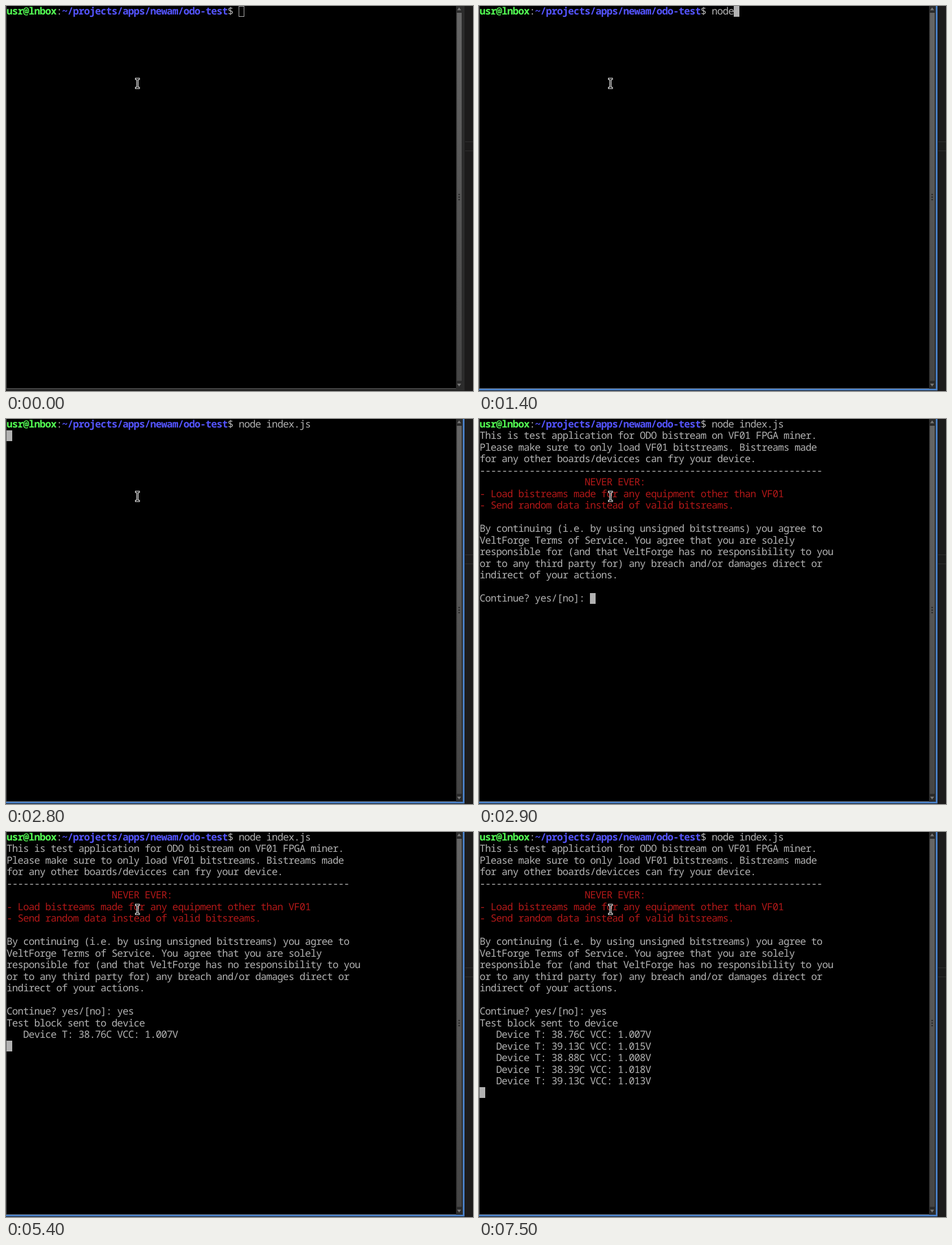
An HTML page that plays this animation: 825x679 px, repeating every 8000 ms.

```html
<!DOCTYPE html>
<html lang="en">
<head>
<meta charset="utf-8">
<title>Terminal session</title>
<style>
  html, body { margin: 0; width: 100%; height: 100%; overflow: hidden; background: #1c1c1c; }
  #stage { position: relative; width: 825px; height: 679px; overflow: hidden; background: #1c1b1b; }
  #stage > * { position: absolute; }
  #frame { left: 0; top: 0; width: 810px; height: 678px; background: #2c2c2c; }
  .focus #frame { background: #4a80c6; }
  #window { left: 0; top: 0; width: 806px; height: 675px; background: #5a5a5a; }
  #paper { left: 1px; top: 0; width: 794px; height: 674px; background: #000; }
  #screen {
    margin: 0; left: 1px; top: -1px; color: #b2b2b2;
    font: 17.6px/20.48px "Noto Sans Mono", "DejaVu Sans Mono", monospace;
    letter-spacing: calc(9.766px - .6em);
    font-variant-ligatures: none; text-rendering: geometricPrecision;
  }
  #screen b { color: #54ff54; }
  #screen b + b { color: #5454ff; }
  #screen i { color: #b21818; font-style: normal; }
  #caret { box-sizing: border-box; height: 19px; border: 1px solid #b2b2b2; }
  .focus #caret { background: #b2b2b2; }
  svg { left: 0; top: 0; }
</style>
</head>
<body>
<div id="stage">
  <div id="frame"></div>
  <div id="window"></div>
  <div id="paper"></div>
  <pre id="screen"></pre>
  <div id="caret"></div>
  <svg width="825" height="679">
    <defs>
      <linearGradient id="thumb" x2="0" y2="1">
        <stop stop-color="#666"/><stop offset="1" stop-color="#454545"/>
      </linearGradient>
    </defs>
    <path fill="#2b2b2b" d="M795 0h12v675h-12z"/>
    <path fill="url(#thumb)" d="M796.5 12h8.5v649h-8.5z"/>
    <path fill="#777" d="M797 7.5l3.5-5 3.5 5zM797 666l3.5 5 3.5-5z"/>
    <path stroke="#292929" stroke-width="2" d="M799 332.5h3m-3 4.5h3m-3 4.5h3"/>
    <path stroke="#303030" d="M811 239.5h14m-14 16h14"/>
    <path fill="none" stroke="#fff" stroke-width="3.6" d="M228 128.5h8.4m-4.2 0v16m-4.2 0h8.4"/>
    <path fill="none" stroke="#000" stroke-width="1.3" d="M229 128.5h6.4m-3.2 0v16m-3.2 0h6.4"/>
  </svg>
</div>
<script>
const LOOP = 8000, FOCUS = 200, CELL = 9.766, LINE = 20.48;
const USER = 'usr@lnbox', PATH = '~/projects/apps/newam/odo-test';
const PROMPT = `${USER}:${PATH}$ `;
const PROMPT_HTML = `<b>${USER}</b>:<b>${PATH}</b>$ `;

const NOTICE = `This is test application for ODO bistream on VF01 FPGA miner.
Please make sure to only load VF01 bitstreams. Bistreams made
for any other boards/devicces can fry your device.
${'-'.repeat(62)}
${' '.repeat(19)}NEVER EVER:
- Load bistreams made for any equipment other than VF01
- Send random data instead of valid bitsreams.

By continuing (i.e. by using unsigned bitstreams) you agree to
VeltForge Terms of Service. You agree that you are solely
responsible for (and that VeltForge has no responsibility to you
or to any third party for) any breach and/or damages direct or
indirect of your actions.

Continue? yes/[no]: `;

const reading = (temp, volts) => `   Device T: ${temp}C VCC: ${volts}V\n`;

// Text appended to the terminal at each time
const EVENTS = [
  [0, PROMPT],
  [1000, 'n'], [1100, 'o'], [1300, 'd'], [1400, 'e'], [1800, ' '],
  [2100, 'i'], [2200, 'n'], [2300, 'dex.js '], [2800, '\n'],
  [2900, NOTICE],
  [3600, 'y'], [3700, 'e'], [4000, 's'], [4400, '\n'],
  [4900, 'Test block sent to device\n'],
  [5400, reading('38.76', '1.007')],
  [5900, reading('39.13', '1.015')],
  [6400, reading('38.88', '1.008')],
  [6900, reading('38.39', '1.018')],
  [7500, reading('39.13', '1.013')],
];

const [stage, screen, caret] = ['stage', 'screen', 'caret'].map(id => document.getElementById(id));
let shown;

function colour(line, row) {
  if (row === 0) return line.replace(PROMPT, PROMPT_HTML);
  return row >= 5 && row <= 7 ? `<i>${line}</i>` : line;
}

function placeCaret(col, row) {
  const left = Math.round(1 + col * CELL), right = Math.round(1 + (col + 1) * CELL);
  caret.style.left = left + 'px';
  caret.style.width = right - left + 'px';
  caret.style.top = Math.floor(row * LINE) + 'px';
}

function draw(now) {
  const t = now % LOOP;
  stage.classList.toggle('focus', t >= FOCUS);
  const text = EVENTS.filter(([at]) => at <= t).map(([, added]) => added).join('');
  if (text !== shown) {
    shown = text;
    const lines = text.split('\n'), row = lines.length - 1;
    screen.innerHTML = lines.map(colour).join('\n');
    placeCaret(lines[row].length, row);
  }
  requestAnimationFrame(draw);
}
draw(performance.now());
</script>
</body>
</html>
```
